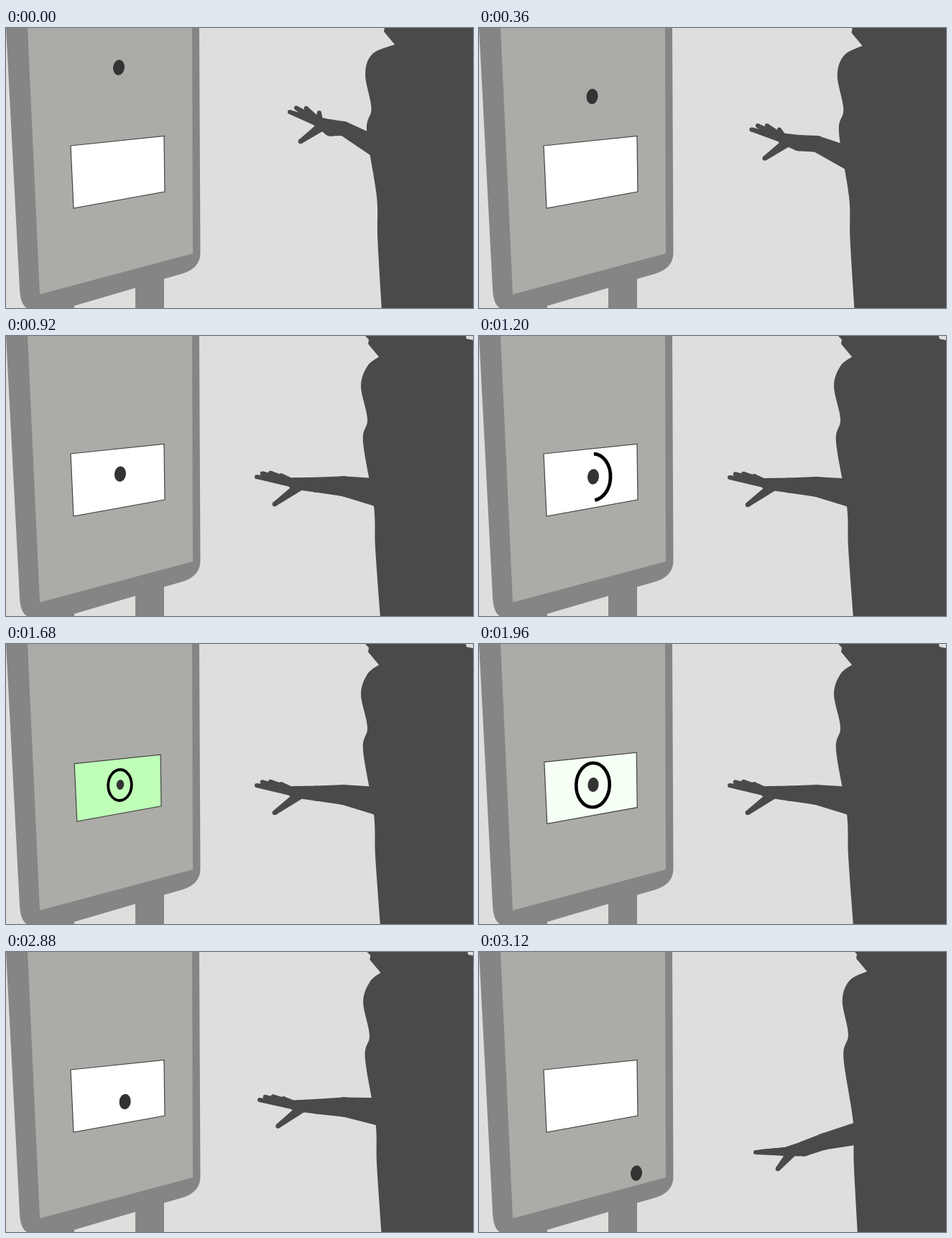
These frames come from a looping animation (650 px wide and 390 px high, 3160 ms). An HTML page with a canvas:

```html
<!DOCTYPE html>
<html lang="en">
<head>
<meta charset="utf-8">
<title>Gesture display</title>
<style>
html, body { margin: 0; width: 100%; height: 100%; overflow: hidden; background: #dededc; }
canvas { display: block; }
</style>
</head>
<body>
<canvas id="stage" width="650" height="390"></canvas>
<script>
const ctx = document.getElementById('stage').getContext('2d');
const LOOP = 3160, STEP = 40, LEAVE = 2760;
const SHADOW = '#4a4a4a';

// arm: joints [x, y, radius] from elbow to palm; fan: arc of fingertips from index to little.
const raised = {
  head: [22, -6], lean: [7, 2], thumb: [410, 158],
  arm: [[520, 168, 15], [470, 140, 10], [452, 139, 11.5], [436, 132, 8]],
  fan: [[395, 117], [405, 104], [436, 118]]
};
const pointing = {
  head: [0, 0], lean: [0, 0], thumb: [374, 235],
  arm: [[520, 219, 20], [470, 210, 14], [432, 208, 10.5], [400, 206, 8]],
  fan: [[349, 197], [358, 187], [383, 195]]
};
const lowered = {
  head: [21, -2], lean: [13, 6], thumb: [416, 302],
  arm: [[530, 252, 16], [480, 264, 11.5], [452, 274, 10.5], [428, 278, 6.5]],
  fan: [[385, 279], [394, 277], [412, 277]]
};
const face = [[500, 0], [505, 5], [504, 11], [519, 29]];
const back = [[503, 42], [494, 70], [503, 116], [497, 148], [512, 237], [514, 295], [521, 392]];
const panel = [[90, 164], [220, 150.5], [221, 228], [94, 251]];

const clamp = v => Math.max(0, Math.min(1, v));
const mix = (a, b, k) => a + (b - a) * k;
const span = (t, a, b) => clamp((t - a) / (b - a));
const smooth = k => k * k * (3 - 2 * k);

function fill(pts, color) {
  ctx.beginPath();
  for (const p of pts) ctx.lineTo(...p);
  ctx.closePath();
  ctx.fillStyle = color;
  ctx.fill();
}

function ellipse(x, y, rx, ry, tilt, from, to) {
  ctx.beginPath();
  ctx.ellipse(x, y, rx, ry, tilt, from, to);
}

// Adds a smooth curve through the points to the current path.
function curve(pts) {
  const at = i => pts[Math.max(0, Math.min(pts.length - 1, i))];
  const handle = (i, dir) => at(i).map((v, c) => v + dir * (at(i + 1)[c] - at(i - 1)[c]) / 6);
  ctx.lineTo(...pts[0]);
  for (let i = 1; i < pts.length; i++)
    ctx.bezierCurveTo(...handle(i - 1, 1), ...handle(i, -1), ...pts[i]);
}

// Fills a rounded limb that tapers from one joint to the next.
function limb([x1, y1, r1], [x2, y2, r2]) {
  const a = Math.atan2(y2 - y1, x2 - x1), nx = -Math.sin(a), ny = Math.cos(a);
  fill([[x1 + nx * r1, y1 + ny * r1], [x2 + nx * r2, y2 + ny * r2],
    [x2 - nx * r2, y2 - ny * r2], [x1 - nx * r1, y1 - ny * r1]], SHADOW);
  for (const [x, y, r] of [[x1, y1, r1], [x2, y2, r2]]) {
    ellipse(x, y, r, r, 0, 0, 7);
    ctx.fill();
  }
}

function drawBoard() {
  ctx.fillStyle = '#858585';
  ctx.fill(new Path2D('M0 0H269L270.5 312Q271 334 246 342L220 349.5V390H180V362L95 387V390H29Q20 385 19 364Z'));
  fill([[30, 0], [259, 0], [260, 314], [47, 371]], '#abaca7');
}

function drawPanel(press) {
  const s = mix(1, 0.923, press);
  const pts = panel.map(([x, y]) => [mix(156.5, x, s), mix(199, y, s)]);
  fill(pts, `rgb(${mix(255, 191, press)},255,${mix(255, 184, press)})`);
  ctx.strokeStyle = '#444';
  ctx.lineWidth = 1.2;
  ctx.stroke();
}

function drawRing(turn, press) {
  if (!turn) return;
  ellipse(158.5, 196.5, mix(24.5, 16.3, press), mix(32.5, 21.5, press), 0.04,
    -Math.PI / 2, (turn * 2 - 0.5) * Math.PI);
  ctx.strokeStyle = '#000';
  ctx.lineWidth = mix(4.8, 3.8, press);
  ctx.stroke();
}

function drawDot(x, y, press) {
  const s = mix(1, 0.65, press);
  ellipse(x, y, 8 * s, 10.7 * s, 0.1, 0, 7);
  ctx.fillStyle = '#333';
  ctx.fill();
}

// kx and ky tell how far the pose is from pointing at the panel.
function drawPerson(pose, kx, ky) {
  const blend = (p, q) => p.map((v, i) => mix(v, q[i], i === 1 ? ky : kx));
  const blendAll = part => pointing[part].map((p, i) => blend(p, pose[part][i]));

  const [hx, hy] = blend(pointing.head, pose.head);
  const [top, foot] = pose.lean.map(v => v * kx ** 0.6);
  const moveHead = ([x, y]) => [x + hx, y + hy];
  const leanBack = ([x, y]) => [x + mix(top, foot, y / 390), y + hy * (1 - y / 390)];
  ctx.beginPath();
  for (const p of [[720, 6], [652, 6], [641, 4], [637, -12], [494, -12], ...face]) ctx.lineTo(...moveHead(p));
  curve([face.at(-1)].map(moveHead).concat(back.map(leanBack)));
  ctx.lineTo(720, 392);
  ctx.fillStyle = SHADOW;
  ctx.fill();

  const arm = blendAll('arm'), [index, bend, little] = blendAll('fan');
  for (let i = 1; i < arm.length; i++) limb(arm[i - 1], arm[i]);
  const [wrist, palm] = arm.slice(-2);
  for (let i = 0; i < 4; i++) {
    const u = i / 3;
    const tip = index.map((v, c) => mix(mix(v, bend[c], u), mix(bend[c], little[c], u), u));
    limb([palm[0], palm[1], 6], [...tip, 3]);
  }
  limb([mix(wrist[0], palm[0], 0.6), mix(wrist[1], palm[1], 0.6), 7], [...blend(pointing.thumb, pose.thumb), 3.3]);
}

function draw(now) {
  const t = Math.floor(now % LOOP / STEP) * STEP;
  const arrive = smooth(span(t, 0, 1020));
  const leave = span(t, LEAVE, 3120) ** 2;
  const press = smooth(span(t, 1440, 1600)) - smooth(span(t, 1840, 2000));

  ctx.fillStyle = '#dededc';
  ctx.fillRect(0, 0, 650, 390);
  drawBoard();
  drawPanel(press);
  drawRing(t < LEAVE ? span(t, 1020, 1400) : 0, press);
  drawDot(mix(157, 159, arrive) + 60 * leave, mix(55, 196, arrive) + 112 * leave, press);
  if (t < LEAVE) drawPerson(raised, 1 - smooth(span(t, 0, 920)), 1 - smooth(span(t, 0, 980)));
  else drawPerson(lowered, leave, leave);
}

function loop() {
  draw(performance.now());
  requestAnimationFrame(loop);
}
loop();
</script>
</body>
</html>
```
